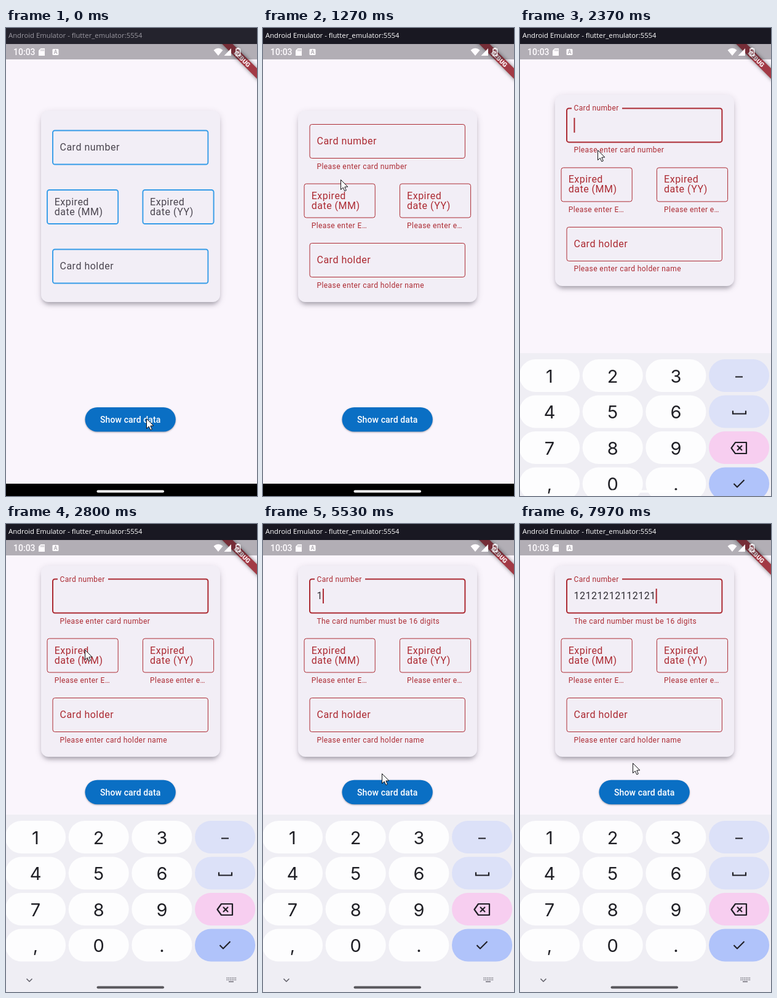
Recreate the animation shown at these times as an HTML page with a canvas. Size 408x760 px, loop 8 s.

```html
<!DOCTYPE html>
<html lang="en">
<head>
<meta charset="utf-8">
<title>Card form</title>
<style>
html, body { margin: 0; width: 100%; height: 100%; overflow: hidden; background: #faf5fc; }
canvas { display: block; width: 408px; height: 760px; }
</style>
</head>
<body>
<canvas id="stage"></canvas>
<script>
const W = 408, H = 760, LOOP = 8000;
const canvas = document.getElementById('stage');
const ctx = canvas.getContext('2d');
const dpr = window.devicePixelRatio || 1;
canvas.width = W * dpr;
canvas.height = H * dpr;

const SANS = 'Roboto, sans-serif';
const INK = [74, 69, 79], RED = [172, 42, 50], BLUE = [54, 156, 232];
const PAGE = '#faf5fc', CARD = '#f2eef6';
const DIGITS = '12121212112121', DIGIT_W = 9.52;

// Event times in ms
const SUBMIT = 230, FOCUS = 2010, FIRST_DIGIT = 4195,
      RESUBMIT = 4740, TYPING = 6200, TYPE_STEP = 140;
// The page follows the keyboard two frames late
const KEYS_UP = 2256, KEYS_LAG = 69, KEYS_TIME = 285;

// Pointer stops: time, x, y
const PATH = [
  [0, 228, 634], [500, 228, 634], [1270, 126, 246], [1550, 126, 198],
  [2450, 126, 198], [2800, 128, 204], [3100, 128, 204], [4030, 216, 432],
  [5000, 216, 432], [5530, 193, 405], [6030, 183, 388], [LOOP, 183, 388]
];

const clamp = v => Math.max(0, Math.min(1, v));
const lerp = (a, b, p) => a + (b - a) * p;
const ramp = (t, start, length) => clamp((t - start) / length);
const easeOut = p => 1 - (1 - p) ** 3;
const smooth = p => p * p * (3 - 2 * p);
const mix = (a, b, p) => `rgb(${a.map((v, i) => Math.round(lerp(v, b[i], p)))})`;
const RED_CSS = `rgb(${RED})`;

// cubic-bezier(0.2, 0, 0, 1), solved by bisection
function emphasized(x) {
  if (x <= 0 || x >= 1) return clamp(x);
  let lo = 0, hi = 1;
  for (let i = 0; i < 24; i++) {
    const s = (lo + hi) / 2;
    if (0.6 * (1 - s) ** 2 * s + s ** 3 < x) lo = s; else hi = s;
  }
  return smooth(lo);
}

function text(s, x, y, font, color, spacing = 0, align = 'left') {
  ctx.font = font;
  ctx.letterSpacing = spacing + 'px';
  ctx.textAlign = align;
  ctx.textBaseline = 'alphabetic';
  ctx.fillStyle = color;
  ctx.fillText(s, x, y);
}

function pill(x, y, w, h, r, color) {
  ctx.beginPath();
  ctx.roundRect(x, y, w, h, r);
  ctx.fillStyle = color;
  ctx.fill();
}

function shape(points, color) {
  ctx.beginPath();
  points.forEach(([x, y]) => ctx.lineTo(x, y));
  ctx.closePath();
  ctx.fillStyle = color;
  ctx.fill();
}

function line(points, color, width) {
  ctx.beginPath();
  points.forEach(([x, y]) => ctx.lineTo(x, y));
  ctx.strokeStyle = color;
  ctx.lineWidth = width;
  ctx.stroke();
}

function withShadow(color, blur, dy, draw) {
  ctx.save();
  ctx.shadowColor = color;
  ctx.shadowBlur = blur * dpr;
  ctx.shadowOffsetY = dy * dpr;
  draw();
  ctx.restore();
}

function pointerAt(t) {
  const i = PATH.findIndex((p, k) => k > 0 && t <= p[0]);
  const [a, b] = [PATH[i - 1], PATH[i]];
  const p = smooth(ramp(t, a[0], b[0] - a[0]));
  return [lerp(a[1], b[1], p), lerp(a[2], b[2], p)];
}

function typedCount(t) {
  if (t < FIRST_DIGIT) return 0;
  if (t < TYPING) return 1;
  return Math.min(DIGITS.length, 2 + Math.floor((t - TYPING) / TYPE_STEP));
}

function caretVisible(t) {
  if (t < FOCUS) return false;
  if (t >= TYPING) return true;
  const since = t < FIRST_DIGIT ? FOCUS : FIRST_DIGIT;
  return Math.floor((t - since) / 500) % 2 === 0;
}

function titleBar(t) {
  const active = t >= 150;
  ctx.fillStyle = active ? '#191822' : '#24232d';
  ctx.fillRect(0, 0, W, 26);
  text('Android Emulator - flutter_emulator:5554', 4, 16,
    '11.3px "Open Sans", sans-serif', active ? '#ffffff' : '#9a98a0');
}

function debugRibbon() {
  ctx.save();
  ctx.beginPath();
  ctx.rect(0, 26, W, H);
  ctx.clip();
  ctx.translate(W, 26);
  ctx.rotate(Math.PI / 4);
  withShadow('rgba(0,0,0,.5)', 6, 0, () => {
    ctx.fillStyle = '#a23a45';
    ctx.fillRect(-45, 28, 90, 12);
  });
  text('DEBUG', 0, 37.7, '900 10.2px ' + SANS, '#fff8fa', 0, 'center');
  ctx.restore();
}

function statusBar() {
  const c = '#fffcff', hole = '#b1aeb4';
  ctx.fillStyle = 'rgba(18,16,24,.31)';
  ctx.fillRect(0, 26, W, 25);
  text('10:03', 12, 43.5, '500 14px ' + SANS, c);

  shape([[56.5, 33], [63, 33], [63, 45], [53, 45], [53, 36.5]], c);
  ctx.fillStyle = hole;
  [56.5, 58.7, 60.8].forEach(x => ctx.fillRect(x, 34.5, 1, 3));

  pill(75.5, 34, 10, 10, 1.5, c);
  text('A', 80.5, 42.2, '700 8.5px ' + SANS, hole, 0, 'center');

  ctx.beginPath();
  ctx.moveTo(345, 45);
  ctx.lineTo(337.5, 36);
  ctx.quadraticCurveTo(345, 29.5, 352.5, 36);
  ctx.closePath();
  ctx.fillStyle = c;
  ctx.fill();
  shape([[366, 33], [366, 45], [354.5, 45]], c);

  ctx.strokeStyle = c;
  ctx.lineWidth = 1.4;
  ctx.strokeRect(374, 34, 6.5, 11);
  ctx.fillStyle = c;
  ctx.fillRect(375.5, 32, 3.5, 2);
  shape([[378, 35.5], [375.2, 40.2], [377, 40.2], [376.4, 43.5], [379.4, 38.8], [377.6, 38.8]], c);
}

function outline(x, y, w, color, width, gap) {
  ctx.save();
  if (gap > 0) {
    const mid = x + 49, half = 41 * gap;
    ctx.beginPath();
    ctx.rect(0, 0, W, H);
    ctx.rect(mid - half, y - 3, half * 2, 6);
    ctx.clip('evenodd');
  }
  ctx.beginPath();
  ctx.roundRect(x, y, w, 55, 3.5);
  ctx.strokeStyle = color;
  ctx.lineWidth = width;
  ctx.stroke();
  ctx.restore();
}

function helper(s, x, y, p) {
  ctx.globalAlpha = p;
  text(s, x, y - 5 * (1 - p), '12px ' + SANS, RED_CSS, 0.42);
  ctx.globalAlpha = 1;
}

function form(t, inset) {
  const top = 134.5 - inset / 4;
  const err = ramp(t, SUBMIT, 167);
  const float = smooth(ramp(t, FOCUS, 167));
  const swap = ramp(t, RESUBMIT, 167);
  const rise = t < SUBMIT ? 32 : 22;
  const labelInk = mix(INK, RED, err);
  const border = mix(BLUE, RED, err);
  const thin = lerp(1.9, 1, err);
  const big = '16px ' + SANS;

  withShadow('rgba(70,60,85,.18)', 11, 3, () => pill(57, top, 291, 310.5, 12, CARD));
  withShadow('rgba(40,36,50,.28)', 6, 4.5, () => pill(59, top + 4, 287, 306, 12, CARD));
  pill(57, top, 291, 310.5, 12, CARD);

  const y1 = top + rise, y2 = y1 + 96.5, y3 = y2 + 96.5;

  outline(76, y1, 252.4, border, lerp(thin, 2, float), float);
  text('Card number', 87.5, y1 + lerp(32.5, 4, float), lerp(16, 12, float) + 'px ' + SANS,
    labelInk, lerp(0.5, 0.375, float));
  helper('Please enter card number', 87.5, y1 + 72, err * (1 - swap));
  helper('The card number must be 16 digits', 87.5, y1 + 72, swap);

  const n = typedCount(t);
  text(DIGITS.slice(0, n), 87.5, y1 + 32.7, big, '#302d34', 0.53);
  if (caretVisible(t)) {
    ctx.fillStyle = RED_CSS;
    ctx.fillRect(87.4 + n * DIGIT_W, y1 + 15.5, 2, 24);
  }

  [[67, '(MM)', 'E'], [222.4, '(YY)', 'e']].forEach(([x, unit, initial]) => {
    outline(x, y2, 115.2, border, thin, 0);
    text('Expired', x + 11.7, y2 + 24.5, big, labelInk, 0.5);
    text('date ' + unit, x + 11.7, y2 + 40.5, big, labelInk, 0.5);
    helper(`Please enter ${initial}…`, x + 11.7, y2 + 72, err);
  });

  outline(76, y3, 252.4, border, thin, 0);
  text('Card holder', 87.5, y3 + 32.5, big, labelInk, 0.5);
  helper('Please enter card holder name', 87.5, y3 + 72, err);
}

function ripple(t, start, x, y) {
  const p = ramp(t, start, 450);
  if (p <= 0 || p >= 1) return;
  ctx.beginPath();
  ctx.arc(x, y, 20 + 130 * easeOut(p), 0, 7);
  ctx.fillStyle = `rgba(255,255,255,${0.14 * (1 - p)})`;
  ctx.fill();
}

function button(t, inset) {
  const y = 616 - inset * 0.747;
  withShadow('rgba(40,36,50,.4)', 2.5, 1, () => pill(128.5, y, 147.3, 39.5, 19.75, '#0a6fc4'));
  ctx.save();
  ctx.beginPath();
  ctx.roundRect(128.5, y, 147.3, 39.5, 19.75);
  ctx.clip();
  ripple(t, SUBMIT - 60, 228, 634);
  ripple(t, RESUBMIT - 60, 216, 432);
  ctx.restore();
  text('Show card data', 202.2, y + 24.8, '500 14px ' + SANS, '#ffffff', 0.1, 'center');
}

function keyboard(dy) {
  const dark = '#1f1f25';
  ctx.save();
  ctx.translate(0, dy);
  ctx.fillStyle = '#efeef4';
  ctx.fillRect(0, 472, W, 300);

  const sides = ['#dce1f8', '#dce1f8', '#f7cef0', '#b0c3fa'];
  ['123', '456', '789', ',0.'].forEach((row, r) => {
    const cy = 508.5 + r * 58.5;
    for (let c = 0; c < 4; c++) {
      const cx = 48 + c * 102.7;
      pill(cx - 49, cy - 26.5, 98, 53, 26, c < 3 ? '#fdfdfe' : sides[r]);
      if (c < 3) text(row[c], cx, cy + 11.2, '29px Inter, sans-serif', dark, 0, 'center');
    }
  });

  line([[350, 510.5], [362, 510.5]], dark, 2);
  line([[346, 565.5], [346, 570.5], [367, 570.5], [367, 565.5]], dark, 2.2);
  ctx.lineJoin = 'round';
  line([[350, 617], [368, 617], [368, 635], [350, 635], [343.5, 626], [350, 617], [352, 617]], dark, 2.2);
  line([[353, 622], [361, 630]], dark, 2.2);
  line([[361, 622], [353, 630]], dark, 2.2);
  line([[347.5, 684], [353, 689.5], [364.5, 678]], dark, 2.1);

  line([[33.5, 738.5], [38, 743], [42.5, 738.5]], '#5e5d66', 1.5);
  ctx.fillStyle = '#74737c';
  for (let r = 0; r < 2; r++)
    for (let c = 0; c < 6; c++) ctx.fillRect(358.5 + c * 2.8, 736.5 + r * 3, 1.6, 1.6);
  ctx.fillRect(362, 742.5, 8, 1.6);
  ctx.restore();
}

function pointer(x, y) {
  ctx.save();
  ctx.translate(x + 0.5, y + 0.5);
  ctx.lineJoin = 'miter';
  shape([[0, 0], [0, 16], [3.7, 12.6], [6.3, 18.3], [8.8, 17.2], [6.3, 11.6], [11.3, 11.4]], '#ffffff');
  ctx.strokeStyle = '#101014';
  ctx.lineWidth = 1;
  ctx.stroke();
  ctx.restore();
}

function draw(t) {
  ctx.setTransform(dpr, 0, 0, dpr, 0, 0);
  ctx.fillStyle = PAGE;
  ctx.fillRect(0, 0, W, H);

  const inset = 268 * emphasized(ramp(t, KEYS_UP + KEYS_LAG, KEYS_TIME));
  form(t, inset);
  button(t, inset);
  debugRibbon();
  statusBar();
  titleBar(t);

  ctx.fillStyle = '#000';
  ctx.fillRect(0, 740, W, 20);
  const up = emphasized(ramp(t, KEYS_UP, KEYS_TIME));
  if (up > 0) keyboard(288 * (1 - up));
  const settled = ramp(t, KEYS_UP + KEYS_TIME, 100);
  pill(147.5, 750.5, 109.5, 4, 2, mix([255, 255, 255], [88, 87, 92], settled));

  pointer(...pointerAt(t));
}

function frame(now) {
  draw(now % LOOP);
  requestAnimationFrame(frame);
}
requestAnimationFrame(frame);
</script>
</body>
</html>
```
